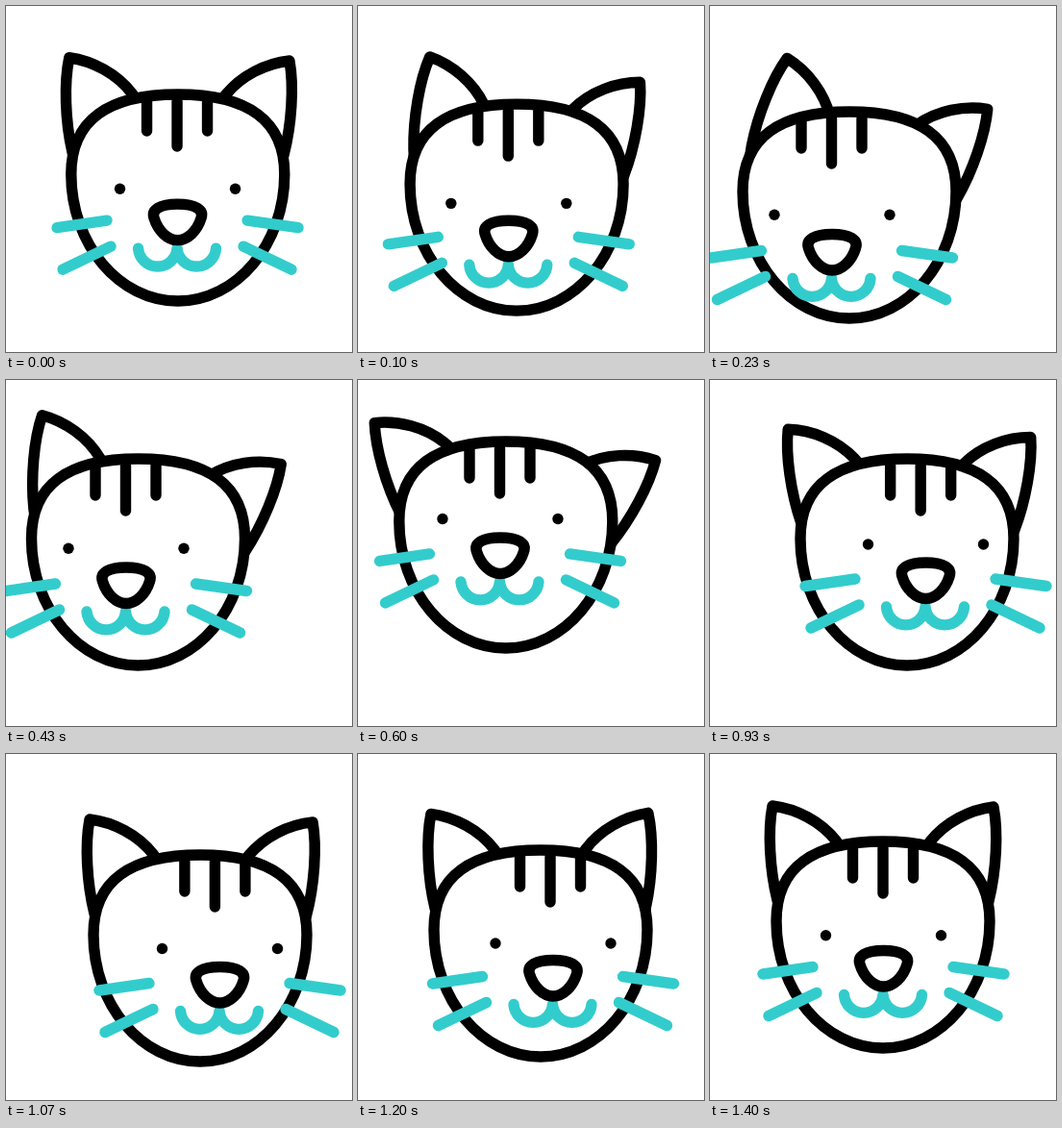
An HTML page that plays this animation: 360 px wide and 360 px high, repeating every 1.67 s.

```html
<!DOCTYPE html>
<html lang="en">
<head>
<meta charset="utf-8">
<title>Cat</title>
<style>
html, body { margin: 0; width: 100%; height: 100%; overflow: hidden; background: #fff; }
svg { display: block; width: 100vw; height: 100vh; }
path { stroke-width: 11.400; stroke-linecap: round; stroke-linejoin: round; }
.line { stroke: #000; fill: #fff; }
.teal { stroke: #3cc; fill: none; }
</style>
</head>
<body>
<svg viewBox="0 0 360 360">
  <path id="earL" class="line" d="M150 119C143 107 138 99 131 90C115 70 90 57 65 54C60 80 62 120 70 152C73 163 76 172 80 180"/>
  <path id="earR" class="line" d="M210 120C217 108 222 100 229 91C245 71 270 58 295 55C300 81 298 121 290 153C287 164 284 173 280 181"/>
  <path id="face" class="line" d="M180 91C107 91 69 118 69 174C69 247 119 306 180 306C241 306 291 247 291 174C291 118 253 91 180 91Z"/>
  <path id="bars" class="line" d="M148.500 98V129M180 98V145M211.500 98V129"/>
  <g id="eyes"><circle cx="120.500" cy="188.700" r="5.700"/><circle cx="240.500" cy="188.700" r="5.700"/></g>
  <g id="muzzle">
    <path class="teal" d="M139.500 250.500A20.300 20.300 0 0 0 180 250.500A20.300 20.300 0 0 0 220.500 250.500"/>
    <path class="teal" d="M55 229L107 221.500M61 272.500L111 248.500M253 221.500L306 229M249 248.500L299 272.500"/>
    <path class="line" d="M180.500 204.500C199 204.500 208 210 205 219C201 232 191 242 180.500 242C170 242 160 232 156 219C153 210 162 204.500 180.500 204.500Z"/>
  </g>
</svg>
<script>
const FPS = 30, LOOP = 1670, FIRST = -1, LAST = 42;

// Key poses of the head roll: down left, up left, top, right, down right, settling.
const rest = { faceX: 0, faceY: 0, noseX: 0, noseY: 0, turnL: 0, turnR: 0 };
const poses = [
  { at: FIRST, ...rest },
  { at: 7, faceX: -35, faceY: 19, noseX: -53.5, noseY: 33, turnL: 25, turnR: 16 },
  { at: 13, faceX: -42.5, faceY: -9, noseX: -55.5, noseY: -9.5, turnL: 8, turnR: 19.5 },
  { at: 22, faceX: -6, faceY: -31, noseX: -4.5, noseY: -49, turnL: -22, turnR: 25 },
  { at: 28, faceX: 25, faceY: -9, noseX: 44, noseY: -14.5, turnL: -5, turnR: 7 },
  { at: 32, faceX: 22, faceY: 14, noseX: 42, noseY: 17, turnL: 0, turnR: 1 },
  { at: 36, faceX: 10, faceY: 9, noseX: 22.5, noseY: 10, turnL: 0.5, turnR: -1.5 },
  { at: LAST, ...rest }
];

function slope(i, key) {
  if (i === 0 || i === poses.length - 1) return 0;
  const [a, b, c] = poses.slice(i - 1, i + 2);
  const h0 = b.at - a.at, h1 = c.at - b.at;
  return ((b[key] - a[key]) / h0 * h1 + (c[key] - b[key]) / h1 * h0) / (h0 + h1);
}

// Smooth cubic through the poses, at rest at both ends.
function sample(step, key) {
  let i = 0;
  while (i < poses.length - 2 && step >= poses[i + 1].at) i++;
  const a = poses[i], b = poses[i + 1], h = b.at - a.at;
  const u = (step - a.at) / h, v = 1 - u;
  return v * v * (1 + 2 * u) * a[key] + u * u * (3 - 2 * u) * b[key]
    + h * u * v * (v * slope(i, key) - u * slope(i + 1, key));
}

const el = id => document.getElementById(id);
const move = (id, x, y, extra = "") =>
  el(id).setAttribute("transform", `translate(${x.toFixed(2)} ${y.toFixed(2)})${extra}`);

function draw(ms) {
  const step = Math.min(LAST, Math.floor((ms + 4) * FPS / 1000));
  const [fx, fy, nx, ny, turnL, turnR] = Object.keys(rest).map(key => sample(step, key));
  move("face", fx, fy);
  move("muzzle", nx, ny);
  move("eyes", nx, ny - 0.07 * Math.hypot(nx, ny));
  // The forehead stripes swing less to the right than the muzzle does.
  move("bars", Math.min(nx, 0.89 * nx), fy);
  // Each ear swings about a pivot inside the head.
  move("earL", fx, fy, ` rotate(${turnL.toFixed(2)} 132 158)`);
  move("earR", fx, fy, ` rotate(${turnR.toFixed(2)} 191 174)`);
}

const start = performance.now();
function tick(now) {
  draw(Math.max(0, now - start) % LOOP);
  requestAnimationFrame(tick);
}
draw(0);
requestAnimationFrame(tick);
</script>
</body>
</html>
```
